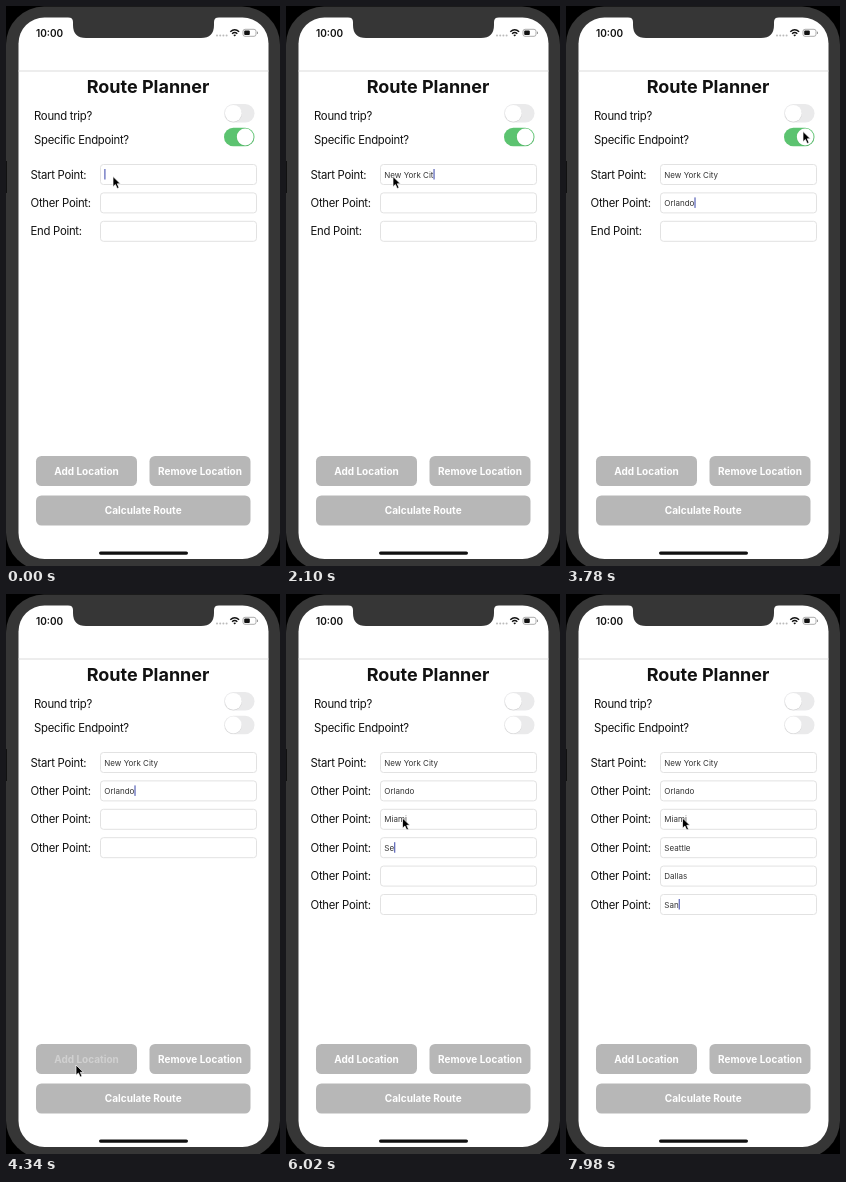
Animation, 274 px wide and 560 px high, one loop 8000 ms. Source, as an HTML page:

```html
<!DOCTYPE html>
<html lang="en">
<head>
<meta charset="utf-8">
<title>Route Planner</title>
<style>
  html, body { margin: 0; width: 100%; height: 100%; overflow: hidden; background: #000; }
  svg { display: block; width: 100%; height: 100%; font-family: Inter, "Liberation Sans", sans-serif; }
  text { fill: #111; white-space: pre; }
  .label { font-size: 11.33px; letter-spacing: -.27px; }
  .value { font-size: 8px; fill: #333; }
  .button { font-size: 10px; font-weight: 700; fill: #fff; text-anchor: middle; }
</style>
</head>
<body>
<svg id="stage" viewBox="0 0 274 560">
  <rect width="274" height="560" fill="#000"/>
  <rect x="0" y="0.5" width="274" height="564" rx="38" fill="#363636"/>
  <rect x="0" y="155" width="1" height="32" fill="#111"/>
  <rect x="12.5" y="11.5" width="250" height="541.5" rx="26" fill="#fff"/>
  <path d="M62 11 Q67 11.5 67 16 V19 Q67 32 80 32 H195 Q208 32 208 19 V16 Q208 11.5 213 11 Z" fill="#363636"/>

  <text x="30" y="30.6" font-size="10" font-weight="600">10:00</text>
  <g fill="#bbb">
    <circle cx="211" cy="29.5" r="1"/><circle cx="214.2" cy="29.5" r="1"/>
    <circle cx="217.4" cy="29.5" r="1"/><circle cx="220.6" cy="29.5" r="1"/>
  </g>
  <g fill="none" stroke="#111" stroke-width="1.5">
    <path d="M224.3 25.8 Q228.7 21.8 233.1 25.8"/>
    <path d="M226.1 27.7 Q228.7 25.4 231.3 27.7"/>
  </g>
  <path d="M227.3 29.1 Q228.7 28 230.1 29.1 L228.7 30.6 Z" fill="#111"/>
  <rect x="237" y="23.3" width="13" height="7" rx="2" fill="none" stroke="#999" stroke-width=".8"/>
  <rect x="238.2" y="24.5" width="5.6" height="4.6" rx="1" fill="#111"/>
  <rect x="251" y="25.6" width="1" height="2.4" rx=".5" fill="#999"/>

  <rect x="12.5" y="64.5" width="250" height="1" fill="#dcdcdc"/>
  <text x="142" y="87" font-size="18" font-weight="700" text-anchor="middle">Route Planner</text>
  <text class="label" x="28" y="113.8">Round trip?</text>
  <text class="label" x="28" y="137.5">Specific Endpoint?</text>
  <g id="switches"></g>
  <g id="rows"></g>
  <rect id="caret" width="1.2" height="10.5" fill="#5862b8"/>
  <g id="buttons"></g>
  <rect x="93" y="545.5" width="89" height="3.2" rx="1.6" fill="#111"/>
  <path id="pointer" d="M0 0 V10.2 L2.4 8 L4.2 12 L6 11.2 L4.3 7.3 H7.4 Z"
        fill="#000" stroke="#fff" stroke-width=".7" stroke-linejoin="round"/>
</svg>
<script>
const LOOP = 8000;
const TOGGLED = 3850;

// Each field: when it gains focus, and when each letter lands.
const fields = [
  { word: "New York City", focus: 0,
    keys: [140, 210, 350, 420, 630, 840, 980, 1120, 1260, 1330, 1470, 2100, 2170] },
  { word: "Orlando", focus: 2310, keys: [2660, 2730, 2800, 2870, 2940, 3010, 3010] },
  { word: "Miami", focus: 5040, keys: [5250, 5320, 5390, 5460, 5530], shown: 0 },
  { word: "Seattle", focus: 5670, keys: [5880, 6020, 6090, 6160, 6230, 6300, 6370], shown: 4200 },
  { word: "Dallas", focus: 6650, keys: [6860, 7000, 7070, 7140, 7210, 7210], shown: 4410 },
  { word: "San", focus: 7420, keys: [7560, 7840, 7980], shown: 4620 }
];
const presses = [[4130, 4200], [4340, 4410], [4550, 4620]];

// Pointer stops: time, x, y.
const path = [
  [3150, 107, 170.5], [3640, 237, 125.5], [3820, 237, 125.5], [3990, 137, 394],
  [4130, 70, 471], [4590, 70, 471], [4830, 115, 223], [5040, 116.5, 224]
];

const $ = id => document.getElementById(id);

function add(parent, tag, attrs, text = "") {
  const node = document.createElementNS("http://www.w3.org/2000/svg", tag);
  for (const key in attrs) node.setAttribute(key, attrs[key]);
  node.textContent = text;
  return parent.appendChild(node);
}

function set(node, attrs) {
  for (const key in attrs) node.setAttribute(key, attrs[key]);
}

const clamp = v => Math.max(0, Math.min(1, v));
const ease = v => v * v * (3 - 2 * v);
const mix = (a, b, p) => a + (b - a) * p;

function makeSwitch(y) {
  const track = add($("switches"), "rect", { x: 218, y: y - 9.3, width: 30.5, height: 18.6, rx: 9.3 });
  add($("switches"), "circle", { cy: y + .6, r: 8.5, fill: "#000", opacity: .1 });
  const knob = add($("switches"), "circle", { cy: y, r: 8.4, fill: "#fff" });
  const shade = knob.previousSibling;
  return on => {
    const cx = mix(227.3, 239.2, on);
    set(track, { fill: `rgb(${mix(234, 92, on)},${mix(234, 195, on)},${mix(235, 112, on)})` });
    set(knob, { cx });
    set(shade, { cx });
  };
}

function makeButton(x, y, width, title) {
  add($("buttons"), "rect", { x, y, width, height: 30, rx: 5.5, fill: "#b7b7b7" });
  return add($("buttons"), "text", { class: "button", x: x + width / 2, y: y + 18.6 }, title);
}

const rowY = i => 168.5 + i * 28.4;

fields.forEach((field, i) => {
  const y = rowY(i);
  field.row = add($("rows"), "g", {});
  field.label = add(field.row, "text", { class: "label", x: 24.5, y: y + 4 }, i ? "Other Point:" : "Start Point:");
  add(field.row, "rect", { x: 94.5, y: y - 10, width: 156, height: 20, rx: 3, fill: "#fff", stroke: "#e2e2e2" });
  field.value = add(field.row, "text", { class: "value", x: 98.3, y: y + 3 });
});

const roundTrip = makeSwitch(107.3);
const endpoint = makeSwitch(131);
const addTitle = makeButton(30, 450, 101, "Add Location");
makeButton(143.5, 450, 101, "Remove Location");
makeButton(30, 489.5, 214.5, "Calculate Route");
roundTrip(0);

function pointerAt(t) {
  const next = path.findIndex(stop => stop[0] > t);
  if (next === 0) return path[0].slice(1);
  if (next < 0) return path[path.length - 1].slice(1);
  const [t0, x0, y0] = path[next - 1];
  const [t1, x1, y1] = path[next];
  const p = ease((t - t0) / (t1 - t0));
  return [mix(x0, x1, p), mix(y0, y1, p)];
}

function draw(t) {
  let active = 0;
  fields.forEach((field, i) => {
    const count = field.keys.filter(key => key <= t).length;
    field.value.textContent = field.word.slice(0, count);
    set(field.row, { visibility: t >= (field.shown || 0) ? "visible" : "hidden" });
    if (t >= field.focus) active = i;
  });
  fields[2].label.textContent = t < TOGGLED ? "End Point:" : "Other Point:";

  const value = fields[active].value;
  const width = value.textContent ? value.getComputedTextLength() : 0;
  set($("caret"), { x: 98.3 + width, y: rowY(active) - 5.5 });

  endpoint(1 - ease(clamp((t - TOGGLED) / 210)));
  const pressed = presses.some(([down, up]) => t >= down && t < up);
  set(addTitle, { opacity: pressed ? .35 : 1 });
  set($("pointer"), { transform: `translate(${pointerAt(t).join(" ")})` });
}

function tick(now) {
  draw(now % LOOP);
  requestAnimationFrame(tick);
}
draw(0);
requestAnimationFrame(tick);
</script>
</body>
</html>
```
